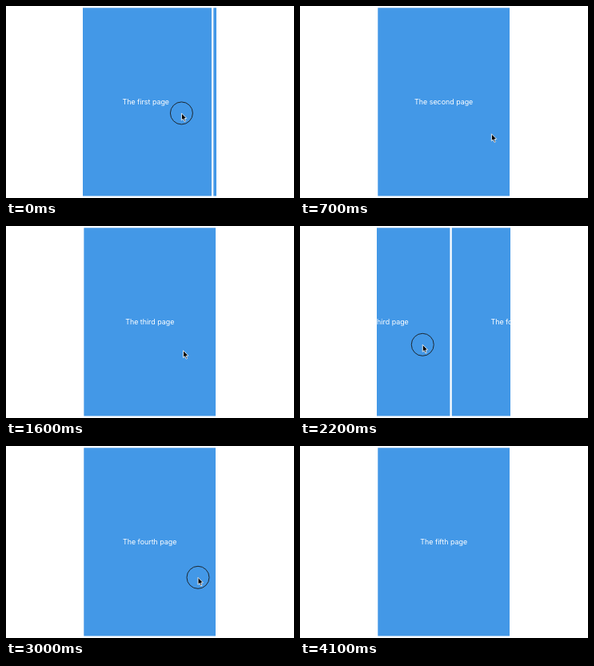
Write an HTML page with a canvas that moves like this. It is 360 px wide and 240 px high and loops after 4200 ms.

```html
<!DOCTYPE html>
<html lang="en">
<head>
<meta charset="utf-8">
<style>
  html, body { margin: 0; width: 100%; height: 100%; overflow: hidden; background: #fff; }
  canvas { display: block; }
</style>
</head>
<body>
<canvas id="stage" width="360" height="240"></canvas>
<script>
const ctx = document.getElementById('stage').getContext('2d');
const LOOP = 4200, HOLD = 220, DRAG = 300, BACK = 500, SNAP = 420;
const PITCH = 167, REST_X = 240, TRAVEL = 120, DIP = 12;
const ordinals = ['first', 'second', 'third', 'fourth', 'fifth'];

// start: drag begins, y: pointer height at rest, slop: travel before the page follows
const swipes = [
  { start: -78, y: 136, slop: 15.6 },
  { start: 925, y: 160, slop: 12 },
  { start: 2005, y: 157, slop: 12.2 },
  { start: 3202, y: 164.3, slop: 9.8 }
];

const clamp = k => Math.min(1, Math.max(0, k));
const smooth = k => k * k * (3 - 2 * k);
const easeOut = k => 1 - (1 - k) ** 3;
const progress = (t, from, duration) => clamp((t - from) / duration);

function swipeShift({ start, slop }, t) {
  const up = start + DRAG;
  const dragged = Math.max(0, TRAVEL * smooth(progress(t, start, DRAG)) - slop);
  return dragged + (PITCH - dragged) * easeOut(progress(t, up, SNAP));
}

function pointerAt(t) {
  const i = swipes.findLastIndex(s => s.start <= t);
  const { start, y } = swipes[i], next = swipes[i + 1];
  const back = smooth(progress(t, start + DRAG, BACK));
  if (!next && back === 1) return null;
  const reach = smooth(progress(t, start, DRAG)) - back;
  const restY = next ? y + (next.y - y) * back : y;
  return { x: REST_X - TRAVEL * reach, y: restY - DIP * reach };
}

function drawPages(scroll) {
  ctx.save();
  ctx.beginPath();
  ctx.rect(96, 2, 167, 236);
  ctx.clip();
  ctx.font = '8.9px Inter, sans-serif';
  ctx.textAlign = 'center';
  ordinals.forEach((word, i) => {
    const x = 97.3 + i * PITCH - scroll;
    ctx.fillStyle = '#4398e7';
    ctx.fillRect(x, 2.3, 164.7, 235.2);
    ctx.fillStyle = '#fff';
    ctx.fillText(`The ${word} page`, x + 82.4, 123);
  });
  ctx.restore();
}

function drawPointer({ x, y }, pressed) {
  ctx.save();
  ctx.translate(x, y);
  ctx.lineWidth = 1;
  if (pressed) {
    ctx.beginPath();
    ctx.arc(0, 0, 14, 0, Math.PI * 2);
    ctx.strokeStyle = '#1c2730';
    ctx.stroke();
  }
  ctx.beginPath();
  for (const [px, py] of [[0, 0], [0, 9], [2, 7.2], [3.6, 10.6], [5, 10], [3.7, 6.7], [6.4, 6.5]])
    ctx.lineTo(px, py);
  ctx.closePath();
  ctx.fillStyle = '#000';
  ctx.fill();
  ctx.strokeStyle = '#dde8f2';
  ctx.stroke();
  ctx.restore();
}

function draw() {
  const t = performance.now() % LOOP;
  ctx.fillStyle = '#fff';
  ctx.fillRect(0, 0, 360, 240);
  drawPages(swipes.reduce((sum, swipe) => sum + swipeShift(swipe, t), 0));
  const pointer = pointerAt(t);
  const pressed = swipes.some(({ start }) => t >= start - HOLD && t < start + DRAG);
  if (pointer) drawPointer(pointer, pressed);
  requestAnimationFrame(draw);
}
draw();
</script>
</body>
</html>
```
